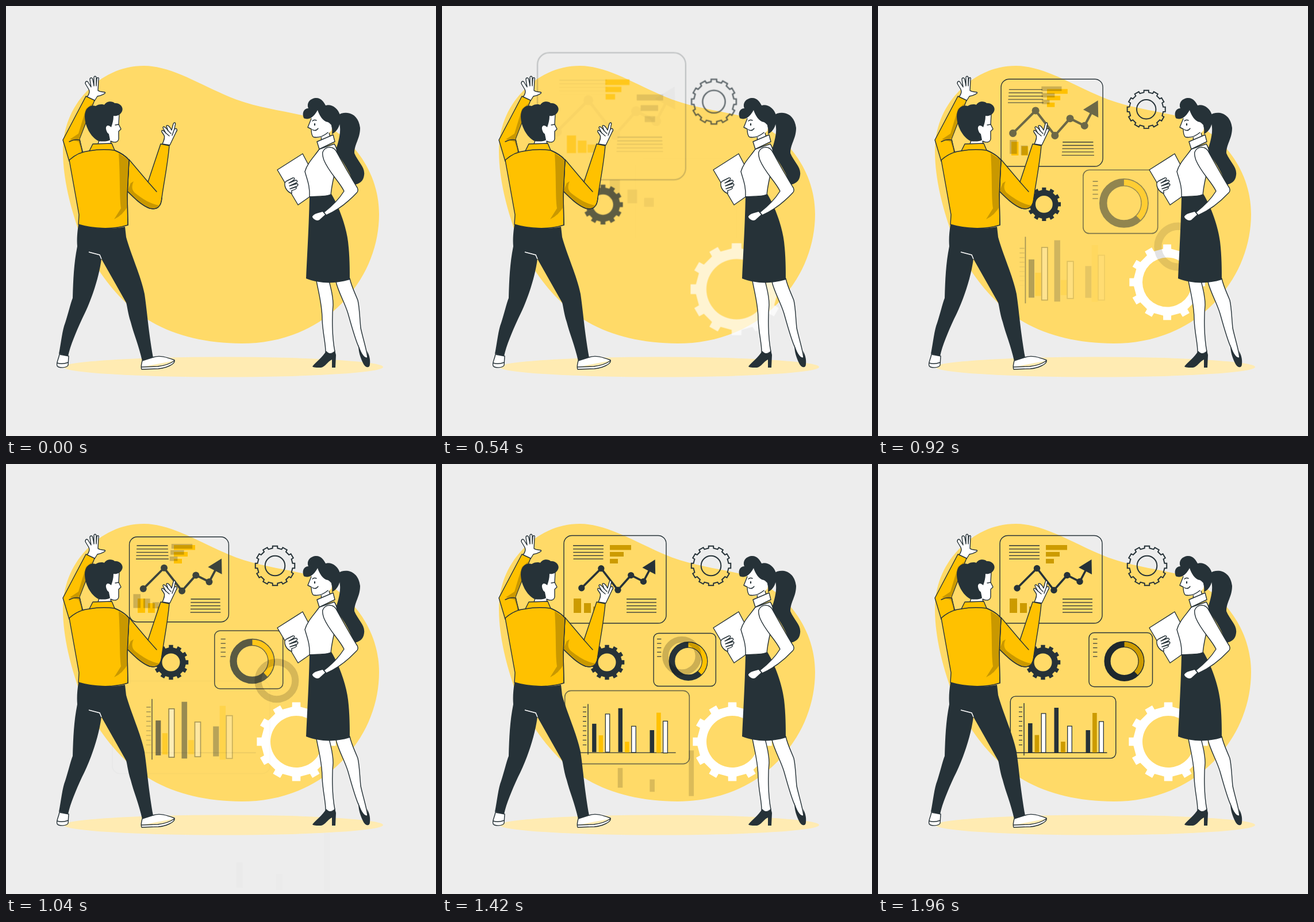
Recreate the animation shown at these times as an HTML page. Size 748 px wide and 748 px high, loop 2000 ms.

```html
<!DOCTYPE html>
<html lang="en">
<head>
<meta charset="utf-8">
<title>Presentation</title>
<style>
html, body { margin: 0; width: 100%; height: 100%; overflow: hidden; background: #ededed; }
svg { display: block; width: 100vw; height: 100vh; }
.ink { fill: #263238; }
.gold { fill: #ffc100; }
.shade { fill: #c99800; }
.white { fill: #fff; }
.line { stroke: #263238; stroke-width: 1.4; stroke-linejoin: round; stroke-linecap: round; }
.open { fill: none; }
</style>
</head>
<body>
<svg viewBox="0 0 748 748">
  <path fill="#ffda68" d="M240 104C290 104 340 139 400 162.5C440 177 480 182 515 190C590 210 649 280 649 362C649 420 625 480 575 526C530 568 470 587 410 587C340 587 280 570 235 538C190 506 150 452 128 395C112 350 99 300 99 252C99 215 112 178 140 149C165 122 200 104 240 104Z"/>
  <ellipse cx="378" cy="628" rx="278" ry="17.5" fill="#ffebb2"/>
  <g id="board"></g>

  <g id="man">
    <path class="white line" d="M141 158C145 153 146 149 144 145L138 135C138 130 142 130 143 133L148 141L146 128C146 124 150 124 151 128L153 139L153 124C154 121 157 122 157 125L157 139L158 126C160 123 162 125 161 128L160 147C164 150 169 149 172 150C175 152 165 156 159 157L154 165Z"/>
    <path class="gold line" d="M139 157L154 164L128 231L134 262L110 270L99 233Z"/>
    <path class="shade" d="M139 179L151 169L128 230L133 256L126 236L111 232L126 222Z"/>
    <path class="line open" d="M110 236Q120 231 128 233L134 256"/>
    <path class="white line" d="M185 190L197 187L196 206L200 214L196 218L196 231C195 238 188 238 182 235L184 246L158 246L164 228Z"/>
    <path class="ink" d="M161 235C147 228 137 208 137 192C137 177 147 171 156 174C163 170 168 171 171 172C175 165 185 165 189 169C198 168 205 176 202 183C199 190 192 192 187 191C187 199 185 205 183 211L179 223L181 233C177 236 168 236 161 235Z"/>
    <path class="white" d="M184 212C178 205 173 208 174 214C175 220 179 225 184 223Z"/>
    <path class="line open" d="M190 207L196 206"/>
    <path class="gold line" d="M214 267L247 306L269 240L284 243C281 278 274 310 271 334C270 349 263 355 250 352C236 347 223 334 211 322Z"/>
    <path class="shade" d="M211 322L217 308L222 305C218 314 219 320 224 325C238 336 252 345 268 347C262 355 252 354 246 350C234 345 222 333 211 322Z"/>
    <path class="line open" d="M247 306L262 323M211 322C223 334 236 347 250 352C263 355 270 349 271 334"/>
    <path class="gold line" d="M145 252L151 240L184 239L189 251C201 256 210 263 214 268L211 328L212 381C184 390 149 387 126 380L127 363L110 268C121 258 134 253 145 252Z"/>
    <path class="shade" d="M190 252L214 268L211 328L212 348Q203 364 188 371L200 352C197 330 199 300 196 256Z"/>
    <path class="line open" d="M145 252Q167 248 189 251C201 256 210 263 214 268L211 328L212 381"/>
    <path class="white line" d="M272 240C275 233 277 228 275 225L271 219C270 215 273 215 278 221L273 212C273 208 277 210 282 217L279 209C280 206 284 208 288 216L291 205C293 201 296 203 294 208L293 214C297 212 299 215 296 219L285 242Z"/>
    <path class="line open" d="M278 221L284 226M282 217L287 222M293 214L289 225"/>
    <path class="ink" d="M126 380C150 388 184 389 207 384L209 402C217 432 235 470 241 501C246 535 247 560 256 612L237 618C231 590 222 570 217 550C212 535 211 522 209 516L166 440C161 478 145 520 132 545C122 567 112 590 108 609L92 605C96 585 98 563 103 551C108 536 112 518 116 508C117 475 118 448 124 418C123 405 124 394 126 380Z"/>
    <path d="M144 428L163 433L166 440" fill="none" stroke="#fff" stroke-width="1.5"/>
    <path class="white line" d="M93 606L109 609L108 625C105 630 92 630 89 626C87 621 91 616 93 606ZM89 621Q98 624 108 620"/>
    <path class="white line" d="M237 617L256 611C267 607 280 611 293 616C295 623 278 630 265 631L236 632C234 627 236 622 237 617ZM236 628L264 627Q282 625 293 617"/>
  </g>

  <g id="woman">
    <path class="ink" d="M577 190C590 181 613 185 616 212C616 231 606 240 606 256C612 271 625 280 623 294C622 305 614 310 605 311C601 295 590 275 573 253C577 240 584 220 580 205Z"/>
    <path class="white line" d="M472 285L516 257L548 318L508 346Z"/>
    <path class="white line" d="M574 480C579 500 589 515 595 535C602 560 608 582 614 594C618 606 624 614 629 612C628 600 620 575 617 560C615 540 615 525 612 512C607 499 601 488 598 474ZM540 478C544 500 550 520 550 545C551 570 556 585 556 602Q563 608 572 601C567 575 567 540 569 520C569 502 565 492 562 478Z"/>
    <path class="ink" d="M533 627C540 618 550 612 557 600C563 607 569 606 572 599L574 607L573 629L567 629L567 615C560 618 555 628 548 629C540 629 535 629 533 627Z"/>
    <path class="ink" d="M613 590C613 600 616 612 622 623C626 630 633 630 633 623C634 615 632 607 628 600C630 612 628 614 624 611C618 606 616 598 613 590Z"/>
    <path class="white line" d="M545 249L571 240C577 248 577 262 575 272C573 290 566 310 565 330L528 332C529 312 523 300 520 288C524 273 537 261 545 249Z"/>
    <path class="white line" d="M548 222L549 241L566 234L561 218Z"/>
    <path class="white line" d="M541 236L569 224L572 236L545 249Z"/>
    <path class="white" d="M533 188L525 211L531 214C531 220 532 226 535 228C545 232 557 226 566 217L569 200L547 180Z"/>
    <path class="line open" d="M531 196L525 211L531 214C531 220 532 226 535 228C545 230 553 226 560 220"/>
    <path class="ink" d="M518 195C514 185 519 178 526 178C522 168 530 160 540 160C548 160 553 167 556 173C566 170 578 178 581 190C583 205 578 217 567 223C568 214 567 205 560 202C551 201 545 190 542 181C537 191 528 200 518 195Z"/>
    <path class="white" d="M566 207C560 202 556 206 558 212C560 216 563 216 566 214Z"/>
    <ellipse class="ink" cx="537" cy="206" rx="1.2" ry="2.3"/>
    <path class="line open" d="M533 200Q536 197 540 199M533 215Q538 219 543 213"/>
    <path class="ink" d="M528 331C541 333 555 331 566 327C580 350 592 385 595 410C598 435 598 460 598 476C572 484 545 483 522 474C524 430 527 380 528 331Z"/>
    <path class="white line" d="M551 254C555 244 568 243 574 252C582 266 600 299 611 316C613 320 612 323 610 325C595 341 575 356 557 364L553 359C566 349 580 335 588 322C580 305 562 290 553 268C551 262 550 258 551 254Z"/>
    <path class="white line" d="M556 363L551 357C545 359 534 360 532 367C535 373 541 375 545 373Z"/>
    <path class="white line" d="M497 326C490 324 484 316 485 308Q486 305 489 304L499 299C503 298 502 302 500 303L492 308L504 303C508 303 507 307 504 308L493 313L506 309C509 310 508 313 505 314L494 318L504 315C507 316 505 319 497 321Z"/>
  </g>
</svg>
<script>
const LOOP = 2000, FPS = 24, DURATION = 1000;
const INK = '#263238', GOLD = '#ffc100';
const PIVOT = [393, 338];
const board = document.getElementById('board');
const parts = [];

// Each part shrinks from 150% around its own centre, or around the corner of the stage.
function add(markup, delay, fromCorner = false) {
  const g = document.createElementNS('http://www.w3.org/2000/svg', 'g');
  g.innerHTML = markup;
  board.append(g);
  const b = g.getBBox();
  parts.push({ g, delay, pivot: fromCorner ? [0, 0] : [b.x + b.width / 2, b.y + b.height / 2] });
}

const path = (d, width = 1.4, fill = 'none') =>
  `<path d="${d}" fill="${fill}" stroke="${INK}" stroke-width="${width}"/>`;
const box = (x, y, w, h, fill, extra = '') =>
  `<rect x="${x}" y="${y}" width="${w}" height="${h}" fill="${fill}" ${extra}/>`;
const panel = (x, y, w, h, r) => box(x, y, w, h, 'none', `rx="${r}" stroke="${INK}" stroke-width="1.4"`);
const shadow = (x, y, w, h, delay) => add(box(x, y, w, h, '#000', 'fill-opacity=".2"'), delay, true);

function rows(x1, x2, y, gap, count, delay, stagger, width = 1.3) {
  for (let i = 0; i < count; i++) add(path(`M${x1} ${y + i * gap}H${x2}`, width), delay + i * stagger);
}

function gearPath(cx, cy, outer, root, hole, tooth) {
  const points = [];
  for (let i = 0; i < 12; i++) {
    for (const [r, k] of [[root, -1.15], [outer, -1], [outer, 1], [root, 1.15]]) {
      const a = (i * 30 - 90 + k * tooth) * Math.PI / 180;
      points.push((cx + r * Math.cos(a)).toFixed(2) + ' ' + (cy + r * Math.sin(a)).toFixed(2));
    }
  }
  const arc = `a${hole} ${hole} 0 1 0 `;
  return `M${points.join('L')}ZM${cx - hole} ${cy}${arc}${2 * hole} 0${arc}${-2 * hole} 0Z`;
}
const solidGear = (fill, ...shape) => `<path fill-rule="evenodd" fill="${fill}" d="${gearPath(...shape)}"/>`;

function build() {
  const first = -30;
  add(solidGear('#fff', 505, 483, 69, 61, 45, 6), 5);
  add(solidGear(INK, 287, 345, 30.5, 26, 15.5, 7), -20);
  add(path(gearPath(468, 177, 34.5, 30.8, 17.3, 7), 2), first);

  // Line chart panel
  const flatBars = [[292, 141, 37, 8.5], [292, 153, 24, 8], [292, 165, 14, 8]];
  const tallBars = [[229, 234, 13, 25], [247, 242, 12, 17], [263, 248, 12, 11]];
  add(panel(212, 124.5, 178, 152.5, 14), 262);
  flatBars.forEach((bar, i) => add(box(...bar, GOLD), first + i * 21));
  tallBars.forEach((bar, i) => add(box(...bar, GOLD), 65 + i * 22));
  rows(321, 373, 235, 5.8, 5, 310, 20);
  rows(228, 281, 142, 5.8, 5, 405, 18);
  flatBars.forEach((bar, i) => shadow(...bar, 85 + i * 21));
  tallBars.forEach((bar, i) => shadow(...bar, 205 + i * 22));
  const dots = [[242, 216], [276.5, 181.5], [306, 219.5], [329, 193.5], [351, 204.5]];
  add(path('M' + dots.join('L') + 'L364 180', 3.6) +
    dots.map(([x, y]) => `<circle cx="${x}" cy="${y}" r="5.7" fill="${INK}"/>`).join('') +
    path('M371.5 166L349 180L372 192Z', 0, INK), 452);

  // Donut panel
  add(panel(367, 293.5, 110.5, 94, 9), 483);
  rows(374, 381.5, 304.5, 7.6, 5, 500, 18, 1.2);
  add(`<circle cx="428.5" cy="343" r="29.5" fill="none" stroke="${INK}" stroke-width="11"/>` +
    `<path d="M428.5 313.7A29.3 29.3 0 0 1 449 364" fill="none" stroke="${GOLD}" stroke-width="8.5"/>`, 532);
  add('<circle cx="428.5" cy="343" r="29.5" fill="none" stroke="#000" stroke-opacity=".2" stroke-width="11"/>', 510, true);

  // Bar chart panel
  add(panel(230, 404, 184, 108, 9), 966);
  add(path('M254 416V507', 1.4), 575);
  rows(245, 251, 423, 8.2, 9, 680, 20, 1.2);
  add(path('M241 502.3H398.5', 1.4), 890);
  const tops = [451, 471.5, 434, 424, 483, 456, 463, 433, 448];
  const colours = [INK, GOLD, '#fff'];
  tops.forEach((top, i) => {
    const x = [261, 306.5, 361.5][Math.floor(i / 3)] + (i % 3) * 11.6;
    const edge = i % 3 === 2 ? `stroke="${INK}" stroke-width="1.3"` : '';
    add(box(x, top, 7.6, 502 - top, colours[i % 3], edge), 605 + i * 22.5);
    if (i % 3 === 1) shadow(x, top, 7.6, 502 - top, 910 + (i - 1) * 5);
  });
}

const bezier = (u, a, b) => 3 * (1 - u) * (1 - u) * u * a + 3 * (1 - u) * u * u * b + u * u * u;

function ease(x) {
  if (x <= 0) return 0;
  if (x >= 1) return 1;
  let low = 0, high = 1;
  for (let i = 0; i < 24; i++) {
    const mid = (low + high) / 2;
    if (bezier(mid, 0.36, 0.5) < x) low = mid; else high = mid;
  }
  return bezier(low, -0.01, 1.38);
}

function zoom(node, [cx, cy], progress) {
  const s = 1.5 - 0.5 * progress;
  node.setAttribute('transform', `translate(${cx * (1 - s)} ${cy * (1 - s)}) scale(${s})`);
  node.setAttribute('opacity', Math.max(0, Math.min(1, progress)));
}

function draw(now) {
  const step = Math.floor(((now % LOOP) + 5) * FPS / 1000) % (LOOP * FPS / 1000);
  const t = step * 1000 / FPS;
  zoom(board, PIVOT, step ? ease((t + 30) / DURATION) : 0);
  for (const p of parts) zoom(p.g, p.pivot, ease((t - p.delay) / DURATION));
}

build();
const start = performance.now();
function tick() {
  draw(performance.now() - start);
  requestAnimationFrame(tick);
}
tick();
</script>
</body>
</html>
```
